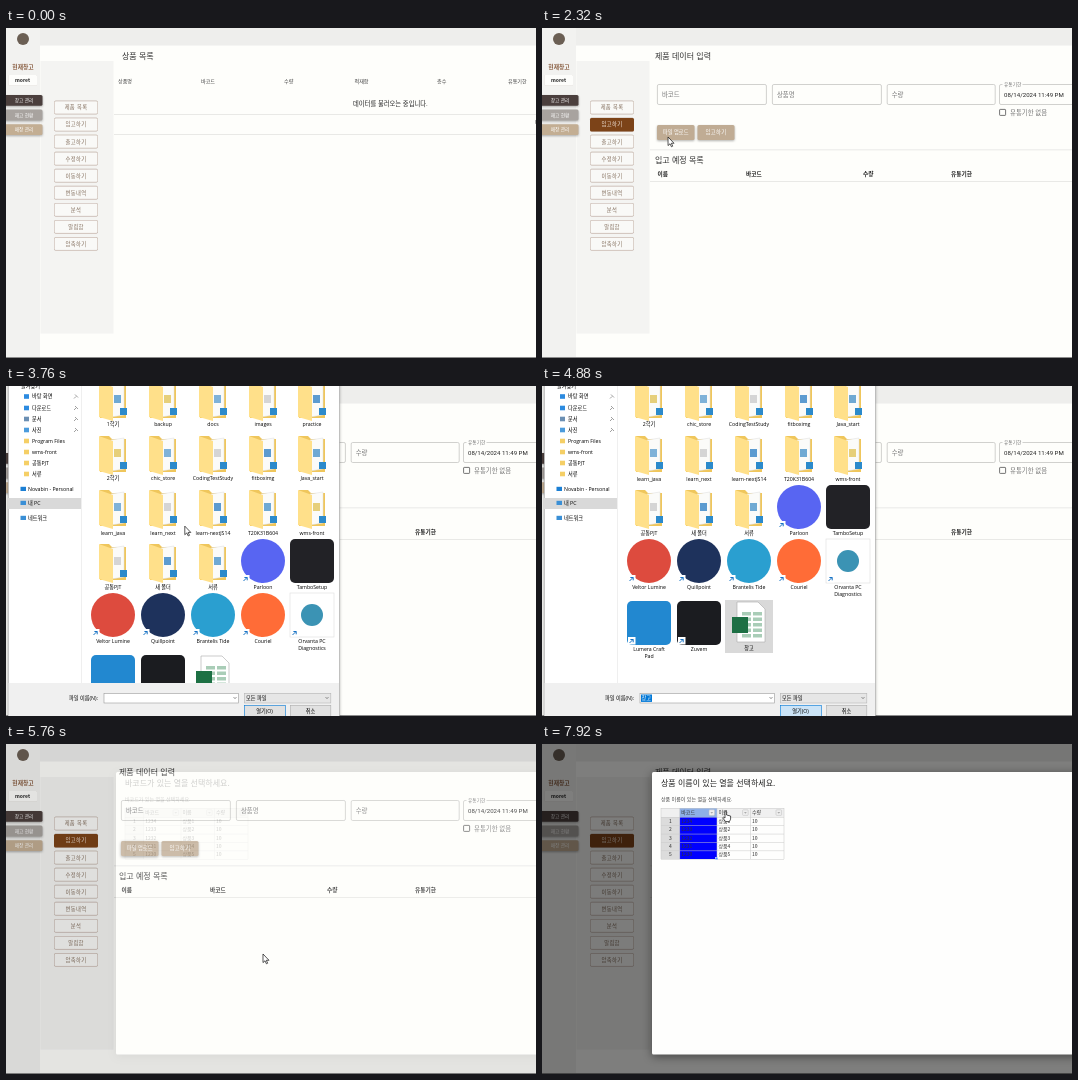
Write an HTML page that moves like this. It is 530 by 330 pixels and loops after 8000 ms.

```html
<!DOCTYPE html>
<html lang="ko">
<head>
<meta charset="utf-8">
<style>
html, body { margin: 0; width: 100%; height: 100%; overflow: hidden; background: #fefefb; }
svg { display: block; width: 530px; height: 330px; }
text { font-family: "Noto Sans CJK KR", "Noto Sans CJK", "Noto Sans", sans-serif; white-space: pre; }
.ui text { font-family: "Open Sans", "Noto Sans CJK KR", "Noto Sans CJK", sans-serif; }
.item { letter-spacing: .35px; }
.flat { filter: drop-shadow(0 .6px .3px rgba(90,60,40,.25)); }
.low { filter: drop-shadow(0 1px 1px rgba(0,0,0,.3)); }
.high { filter: drop-shadow(0 1.5px 1.5px rgba(0,0,0,.4)); }
.edge { filter: drop-shadow(0 1px 1.5px rgba(0,0,0,.3)); }
.deep { filter: drop-shadow(0 2px 5px rgba(0,0,0,.45)); }
</style>
</head>
<body>
<svg id="stage" viewBox="0 0 530 330"></svg>
<script>
// y is the middle of the line of text
const T = (x, y, s, size = 5, fill = '#333', more = '') =>
  `<text x="${x}" y="${y + size * .36}" font-size="${size}" fill="${fill}" ${more}>${s}</text>`;
const R = (x, y, w, h, fill, more = '') =>
  `<rect x="${x}" y="${y}" width="${w}" height="${h}" fill="${fill}" ${more}/>`;
const C = (x, y, r, fill, more = '') => `<circle cx="${x}" cy="${y}" r="${r}" fill="${fill}" ${more}/>`;
const P = (d, fill, more = '') => `<path d="${d}" fill="${fill}" ${more}/>`;
const G = (id, s, more = '') => `<g id="${id}" ${more}>${s}</g>`;
const line = (x, y, w) => R(x, y, w, .8, '#e4e4e1');
const MID = 'text-anchor="middle"', BOLD = 'font-weight="700"', MED = 'font-weight="500"';
const ITEM = MID + ' class="item"';

const menu = ['제품 목록', '입고하기', '출고하기', '수정하기', '이동하기', '변동내역', '분석', '알림함', '압축하기'];
const tabs = [['창고 관리', '#4b3f3d'], ['재고 현황', '#a8a39f'], ['매장 관리', '#c3ae93']];

const base =
  R(0, 0, 530, 330, '#fefefb') + R(34, 0, 496, 17.5, '#eeeeec') + R(34.5, 33, 73, 272.5, '#f4f4f2') +
  R(0, 0, 34, 330, '#f2f2f0', 'style="filter:drop-shadow(.5px 0 .5px #ccc)"') +
  C(17, 11, 6, '#6b5f54') +
  T(17, 39, '현재창고', 5.8, '#8a5f43', MID + BOLD) +
  R(2.5, 47, 28.5, 10.5, '#fdfdfb', 'rx="1" class="flat"') + T(16.5, 52, 'moret', 5, '#222', MID + BOLD) +
  tabs.map(([s, c], i) => R(-2, 67 + i * 14.6, 38.5, 10.8, c, 'rx="1.5" class="low"') +
    T(18, 72.3 + i * 14.6, s, 4.7, '#fff', MID)).join('') +
  menu.map((s, i) => R(48.3, 73 + i * 17.05, 43.4, 13, '#f9f9f7', 'rx="1.5" stroke="#c4b3a8" stroke-width=".6" class="flat"') +
    T(70, 79.5 + i * 17.05, s, 5.3, '#85705f', ITEM)).join('');

const active = R(48, 90, 44, 13.5, '#7c4318', 'rx="1.5"') + T(70, 96.5, menu[1], 5.3, '#f6ebe2', ITEM);

const listPage = T(116, 28, '상품 목록', 8, '#333') +
  [['상품명', 112], ['바코드', 195], ['수량', 278], ['적재함', 348.5], ['층수', 431], ['유통기한', 502]]
    .map(([s, x]) => T(x, 53, s, 5.1, '#444', MED)).join('') +
  T(347, 76, '데이터를 불러오는 중입니다.', 6.3, '#222') +
  line(108, 86, 422) + line(108, 106, 422) + T(528.7, 94, '0', 5, '#555');

const field = (x, w, s) => R(x, 56.5, w, 20, 'none', 'rx="1.5" stroke="#c6c6c3" stroke-width=".8"') +
  T(x + 4.5, 66.3, s, 6.4, '#777');
const formPage = T(113, 28.5, '제품 데이터 입력', 8, '#333') +
  field(115.4, 109, '바코드') + field(230.4, 109, '상품명') + field(345.2, 108, '수량') + field(457.5, 90, '') +
  R(460.5, 54, 20, 4, '#fefefb') + T(462, 56, '유통기한', 4.7, '#777') +
  T(462, 66.5, '08/14/2024 11:49 PM', 6.1, '#222', 'style="font-family:Roboto,sans-serif"') +
  R(457.6, 81.4, 6, 6, 'none', 'rx=".6" stroke="#666" stroke-width=".9"') + T(468, 84.5, '유통기한 없음', 6.4, '#777') +
  R(115, 97, 37.5, 15, '#c0ac94', 'rx="1.5" id="upload"') + T(133.7, 104.3, '파일 업로드', 5.3, '#fff', MID) +
  R(155.5, 97, 37, 15, '#c0ac94', 'rx="1.5" class="low"') + T(174, 104.3, '입고하기', 5.3, '#fff', ITEM) +
  line(108, 121.5, 422) + T(113, 132, '입고 예정 목록', 8, '#333') +
  [['이름', 115.5], ['바코드', 204], ['수량', 321], ['유통기한', 409]]
    .map(([s, x]) => T(x, 146, s, 5.7, '#222', BOLD)).join('') + line(108, 153, 422);

// File dialog
const folder = (x, y, c) => P(`M${x - 13} ${y - 18}h9l3 3h14v33h-26z`, '#efc65c') +
  P(`M${x - 2} ${y - 14}l13 -2v31l-13 2z`, '#fbfbf9', 'stroke="#ddd" stroke-width=".5"') +
  R(x + 1, y - 5, 7, 8, c) + R(x + 7, y + 8, 7, 7, '#2c8acb') +
  P(`M${x - 14} ${y - 18}l14 5v34l-14 -4z`, '#ffe08a');
const label = (x, y, s) => s.split('|').map((p, i) => T(x, y + i * 7.4, p, 5.2, '#000', MID)).join('');
const jump = (x, y) => R(x - 21, y + 14, 7.5, 7.5, '#fff') +
  P(`M${x - 19.5} ${y + 20}l3.5 -3.5m-2.6 0h2.8v2.8`, 'none', 'stroke="#1672c4" stroke-width="1"');
const disc = (x, y, c) => C(x, y, 22, c);
const tile = (x, y, c) => R(x - 22, y - 22, 44, 44, c, 'rx="5"');
const frame = (x, y, c) => R(x - 22, y - 22, 44, 44, '#fff', 'stroke="#ddd" stroke-width=".6"') + C(x, y, 11, c);
const cols = [107, 157, 207, 257, 306];
const folders = [
  ['1학기', 'backup', 'docs', 'images', 'practice'],
  ['2학기', 'chic_store', 'CodingTestStudy', 'fitboximg', 'Java_start'],
  ['learn_java', 'learn_next', 'learn-nextJS14', 'T20K31B604', 'wms-front'],
  ['공통PJT', '새 폴더', '서류']];
const inner = ['#6fa9d3', '#e6cf7a', '#7fb2d8', '#d5d5d5', '#5c9bd0'];
const apps = [
  [257, 121, 'Parloon', '#5865f2', disc], [306, 121, 'TamboSetup', '#222226', tile],
  [107, 175, 'Veltor Lumine', '#dd4b3e', disc], [157, 175, 'Quillpoint', '#1e325c', disc],
  [207, 175, 'Brantelis Tide', '#2a9fd0', disc], [257, 175, 'Couriel', '#ff6c37', disc],
  [306, 175, 'Orvanta PC|Diagnostics', '#3b93b4', frame],
  [107, 237, 'Lumera Craft|Pad', '#2288d0', tile], [157, 237, 'Zuvem', '#1b1c20', tile]];
const files = folders.map((row, r) => row.map((s, i) =>
    folder(cols[i], -40 + r * 54, inner[(i + r) % 5]) + label(cols[i], -16 + r * 54.4, s)).join('')).join('') +
  apps.map(([x, y, s, c, shape]) => shape(x, y, c) + (s == 'TamboSetup' ? '' : jump(x, y)) +
    label(x, y + 26, s)).join('') +
  R(183, 214, 48, 53, '#d9d9d9', 'id="picked"') +
  P('M195 216h21l7 7v33h-28z', '#fff', 'stroke="#aaa" stroke-width=".6"') +
  [0, 1, 2, 3, 4].map(i => R(200, 226 + i * 5.5, 9, 3.5, '#a9cdb7') + R(211, 226 + i * 5.5, 9, 3.5, '#a9cdb7')).join('') +
  R(190, 231, 16, 16, '#1d7044') + label(207, 262, '창고');

const nav = [['바탕 화면', 10.5, '#2c8be0'], ['다운로드', 22, '#2c8be0'], ['문서', 33, '#6b8fb3'], ['사진', 44, '#4b9bdc'],
  ['Program Files', 55, '#f5cf66'], ['wms-front', 66, '#f5cf66'], ['공통PJT', 77, '#f5cf66'], ['서류', 88, '#f5cf66']];
const roots = [['Novabin - Personal', 103, '#1b7fd4'], ['내 PC', 117, '#3a8fd6'], ['네트워크', 132, '#3a8fd6']];
const chevron = x => P(`M${x} 311l1.5 1.7l1.5 -1.7`, 'none', 'stroke="#555" stroke-width=".6"');
const controls = R(2, 112, 73, 11, '#d9d9d9') + R(75, -60, .6, 357, '#e4e4e4') +
  T(15, 0, '즐겨찾기', 5.2, '#000') +
  nav.map(([s, y, c], i) => R(18, y - 2.3, 5, 4.6, c) + T(26, y, s, 5.2, '#000') +
    (i < 4 ? P(`M68 ${y + 2}l2 -2m-1 -2l3 3`, 'none', 'stroke="#888" stroke-width=".8"') : '')).join('') +
  roots.map(([s, y, c]) => R(14.5, y - 2.2, 5.5, 4.2, c) + T(22, y, s, 5.2, '#000')).join('') +
  T(63, 312, '파일 이름(N):', 5.2, '#000') +
  R(98, 307.3, 134.5, 9.7, '#fff', 'stroke="#999" stroke-width=".6"') + chevron(227.5) +
  G('fileName', R(99, 308.5, 11, 7.4, '#0078d7') + T(99.5, 312, '창고', 5.2, '#fff')) +
  R(238.3, 307.3, 86.5, 9.7, '#e6e6e6', 'stroke="#b5b5b5" stroke-width=".6"') + chevron(319.5) +
  T(240, 312, '모든 파일', 5.2, '#000') +
  R(238.3, 319.3, 41, 12, '#e1e1e1', 'id="open" stroke="#0078d7" stroke-width=".6"') + T(258.5, 325, '열기(O)', 5.2, '#000', MID) +
  R(284.3, 319.3, 40.5, 12, '#e1e1e1', 'stroke="#adadad" stroke-width=".6"') + T(304.5, 325, '취소', 5.2, '#000', MID);
const skeleton = [[62, 310, 33, 8], [98, 309, 135, 9], [238, 309, 87, 9], [238, 320.5, 41, 12], [284, 320.5, 41, 12]]
  .map(b => R(...b, '#fff')).join('');
const dialog = R(2.3, -60, 331, 410, '#fff', 'stroke="#aaa" stroke-width=".6" class="edge"') +
  R(2.6, 297, 330.4, 52, '#f0f0f0') + G('skeleton', skeleton) +
  G('content', `<g clip-path="url(#view)">${G('files', files)}</g>` + controls);

// Sheet modal
const xs = [119, 137.8, 175, 208.6, 242], rowY = i => i ? 64.6 + i * 8.4 : 64;
const cell = (s, x, y, more = '') => T(x, y, s, 5, '#333', more);
const sheet = R(119, 64, 123, 9, '#f0f0f0') + R(119, 64, 18.8, 51, '#f0f0f0') +
  G('picks', R(119, 73, 18.8, 42, '#dcdcdc') + R(137.8, 64, 37.2, 9, '#8eb0e7') + R(137.8, 73, 37.2, 42, '#0000ff')) +
  [0, 1, 2, 3, 4, 5, 6].map(i => R(119, rowY(i), 123, .5, '#c8c8c8')).join('') +
  xs.map(x => R(x - .25, 64, .5, 51, '#c8c8c8')).join('') +
  ['바코드', '이름', '수량'].map((s, i) => cell(s, xs[i + 1] + 1.4, 68.5) +
    R(xs[i + 2] - 8, 65.8, 5.6, 5.6, '#eee', 'rx=".8" stroke="#bbb" stroke-width=".5"') +
    P(`M${xs[i + 2] - 6.6} 68h2.8l-1.4 1.8z`, '#aaa')).join('') +
  [1, 2, 3, 4, 5].map(i => {
    const y = 68.6 + i * 8.4;
    return cell(i, 128.3, y, MID) + cell(1235 - i, 139.2, y) + cell('상품' + i, 176.4, y) + cell(10, 210, y);
  }).join('') +
  G('handle', R(173.3, 113.2, 2.6, 2.6, '#4b89ff', 'stroke="#fff" stroke-width=".4"'));
const ask = (id, s) => G(id, T(119, 39, s, 8, '#222') + T(119, 55.3, s, 5, '#444'));
const modal = R(0, 0, 530, 330, 'rgba(0,0,0,.5)') + R(110, 28, 440, 282.5, '#fefefd', 'rx="1.5" class="deep"') +
  ask('ask1', '바코드가 있는 열을 선택하세요.') + ask('ask2', '상품 이름이 있는 열을 선택하세요.') + sheet;

const INK = 'stroke="#111" stroke-width=".7" stroke-linejoin="round"';
const arrow = P('M0 0v8.6l2 -1.8l1.4 3l1.3 -.6l-1.4 -2.9h2.7z', '#fff', INK);
const hand = P('M0 .6q.9 -1 1.6 0v3.4l4 1v3.2l-1.2 2.4h-3.8l-3 -3.8q.6 -1.2 2.4 .2z', '#fff', INK);

const $ = id => document.getElementById(id);
$('stage').innerHTML =
  `<defs><clipPath id="view">${R(76, -60, 257, 357)}</clipPath></defs>` +
  base + G('hover', R(48.3, 90, 43.4, 13, '#f6f5f2', 'rx="1.5" stroke="#b5a498" stroke-width=".6" class="high"') +
    T(70, 96.5, menu[1], 5.3, '#85705f', ITEM)) +
  G('active', active) + C(67, 97, 0, '#8a5f4a', 'id="ripple"') +
  G('list', listPage) + G('form', formPage) + R(0, 329, 530, 1, '#8c8c8c') +
  G('dialog', dialog, 'class="ui"') + G('modal', modal) + G('arrow', arrow) + G('hand', hand);

const ramp = (t, a, b) => Math.min(1, Math.max(0, (t - a) / (b - a)));
const show = (id, on) => $(id).setAttribute('visibility', on ? 'inherit' : 'hidden');
const fade = (id, v) => { $(id).setAttribute('opacity', v); show(id, v > 0); };

// time, x, y of the pointer tip
const path = [[1120, 84, 106], [1360, 66.5, 100.5], [1720, 66.5, 100.5], [2160, 112, 106], [2320, 126, 109], [2480, 131, 104],
  [2720, 131, 104], [2960, 128.5, 110], [3520, 128.5, 110], [3920, 212, 160], [4160, 212, 180], [4320, 208, 240],
  [4420, 208, 240], [4600, 262, 324], [4720, 262, 334], [5360, 262, 334], [5640, 257, 210], [5760, 257, 210],
  [5920, 256, 208], [6160, 246, 167], [6320, 225, 140], [6560, 163, 72], [6960, 156, 69], [7440, 156, 69], [7760, 183, 67]];
function pointer(t) {
  const i = path.findIndex(k => k[0] > t);
  if (i < 1) return path[path.length - 1].slice(1);
  const [a, x, y] = path[i - 1], [b, u, v] = path[i], p = ramp(t, a, b);
  return [x + (u - x) * p, y + (v - y) * p];
}

function draw(t) {
  show('list', t < 1600);
  show('form', t >= 1600);
  show('hover', t >= 1280 && t < 1850);
  fade('active', ramp(t, 1560, 1800));
  $('ripple').setAttribute('r', 11 * ramp(t, 1400, 1520));
  $('ripple').setAttribute('opacity', .28 * (1 - ramp(t, 1560, 1800)));
  $('upload').setAttribute('class', t >= 2480 ? 'high' : 'low');

  const d = ramp(t, 3100, 3380) * (1 - ramp(t, 4890, 5200)), k = .94 + .06 * d;
  fade('dialog', d);
  $('dialog').setAttribute('transform', `translate(168 107) scale(${k}) translate(-168 -107)`);
  show('skeleton', t < 3440);
  show('content', t >= 3440);
  $('files').setAttribute('transform', `translate(0 ${54 * (1 - ramp(t, 3880, 4120))})`);
  show('picked', t >= 4400);
  show('fileName', t >= 4400);
  $('open').setAttribute('fill', t >= 4560 ? '#cce4f7' : '#e1e1e1');

  fade('modal', ramp(t, 5720, 5920));
  const picked = t >= 7280;
  for (const id of ['picks', 'handle', 'ask2']) show(id, picked);
  show('ask1', !picked);

  const [x, y] = pointer(t), on = t >= 1120;
  const link = t >= 1280 && t < 1760 || t >= 2400 && t < 2840 || t >= 7600;
  show('arrow', on && !link);
  show('hand', on && link);
  for (const id of ['arrow', 'hand']) $(id).setAttribute('transform', `translate(${x} ${y})`);
}

const start = performance.now();
function tick() {
  draw((performance.now() - start) % 8000);
  requestAnimationFrame(tick);
}
tick();
</script>
</body>
</html>
```
